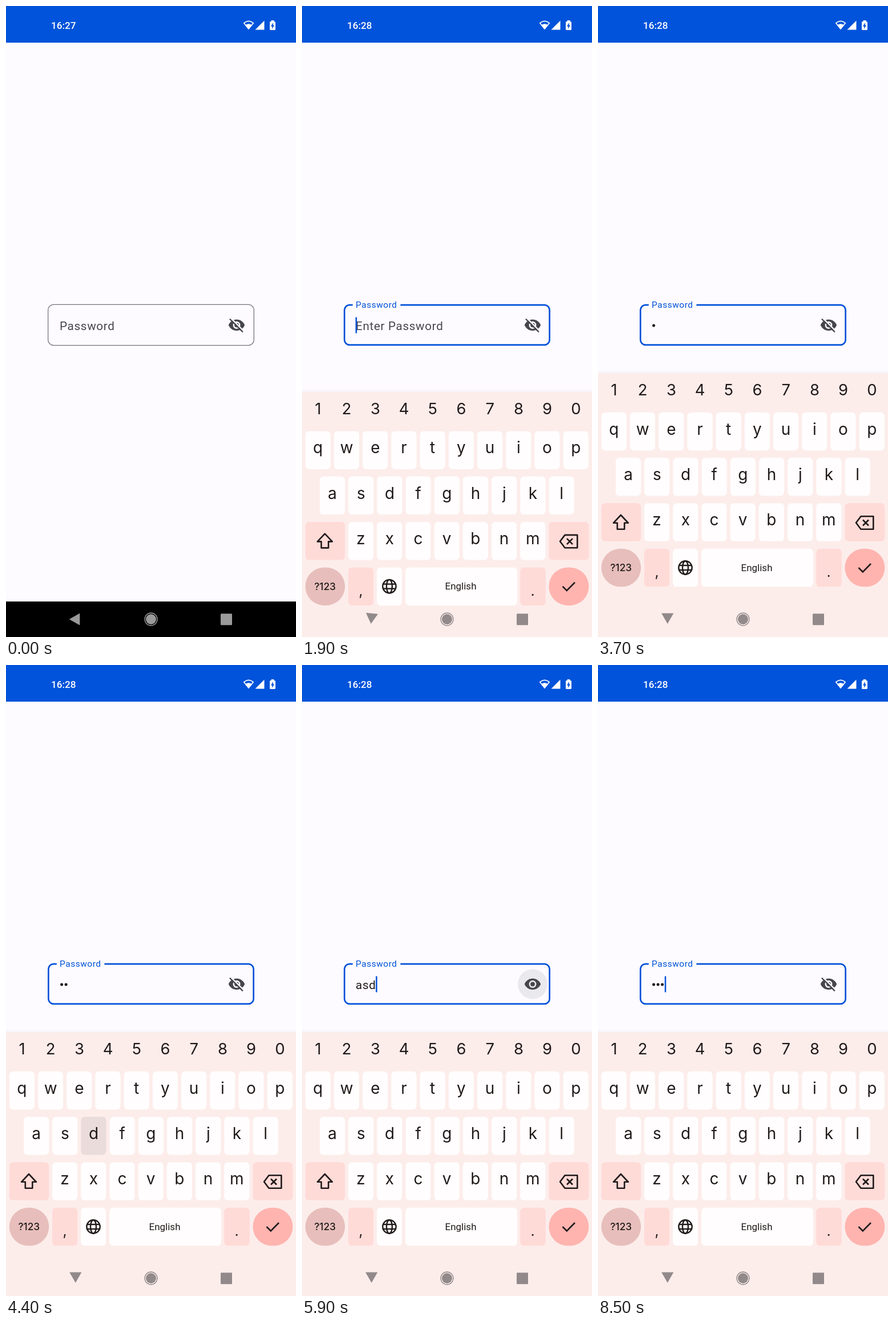
Recreate the animation shown at these times as an HTML page with a canvas. Size 508 by 1102 pixels, loop 9000 ms.

```html
<!DOCTYPE html>
<html lang="en">
<head>
<meta charset="utf-8">
<title>Password field</title>
<style>
  html, body { margin: 0; height: 100%; overflow: hidden; background: #fdfbff; }
  canvas { display: block; width: 100vw; height: 100vh; }
</style>
</head>
<body>
<canvas id="stage"></canvas>
<script>
const W = 508, H = 1102, LOOP = 9000, STEP = 100;
const BLUE = '#0052d9', PAGE = '#fdfbff', INK = '#201a1a', GREY = '#46464c';
const PINK = '#fcedeb', KEY = '#fffdfd', SOFT = '#ffdbd8', DOWN = '#eadcda';
const ROBOTO = 'Roboto, sans-serif', INTER = 'Inter, sans-serif';

const canvas = document.getElementById('stage');
const c = canvas.getContext('2d');
const dpr = window.devicePixelRatio || 1;
canvas.width = W * dpr;
canvas.height = H * dpr;

const TYPED = [3200, 3900, 4500];
const WORD = 'asd';
const PEEKS = [[5500, 6400], [6900, 7700]];
const FOCUS = 1700;

const clamp = x => Math.min(1, Math.max(0, x));
const mix = (a, b, p) => a + (b - a) * p;
const ramp = (t, from, to) => clamp((t - from) / (to - from));

function text(str, x, y, size, color, { font = ROBOTO, weight = 400, gap = 0, align = 'left' } = {}) {
  c.font = `${weight} ${size}px ${font}`;
  c.letterSpacing = gap + 'px';
  c.textAlign = align;
  c.fillStyle = color;
  c.fillText(str, x, y);
}

function box(x, y, w, h, r, color) {
  c.fillStyle = color;
  c.beginPath();
  c.roundRect(x, y, w, h, r);
  c.fill();
}

function disc(x, y, r, color) {
  c.fillStyle = color;
  c.beginPath();
  c.arc(x, y, r, 0, 7);
  c.fill();
}

function poly(points, closed) {
  c.beginPath();
  points.forEach(([x, y]) => c.lineTo(x, y));
  if (closed) c.closePath();
}

function outline(points, closed, width = 2.6) {
  c.strokeStyle = INK;
  c.lineWidth = width;
  poly(points, closed);
  c.stroke();
}

function fillPoly(points, color) {
  c.fillStyle = color;
  poly(points, true);
  c.fill();
}

function statusBar(t) {
  c.fillStyle = '#0053da';
  c.fillRect(0, 0, W, 64);
  text(t < 100 ? '16:27' : '16:28', 79, 39.5, 17.2, '#fff', { weight: 500 });

  // wifi
  c.strokeStyle = '#fff';
  c.lineWidth = 1.7;
  c.lineJoin = 'round';
  c.beginPath();
  c.moveTo(425, 40);
  c.lineTo(416.7, 29.8);
  c.quadraticCurveTo(425, 22.8, 433.3, 29.8);
  c.closePath();
  c.stroke();
  c.fillStyle = '#fff';
  c.beginPath();
  c.moveTo(425, 41);
  c.lineTo(419, 33.5);
  c.quadraticCurveTo(425, 28.8, 431, 33.5);
  c.fill();

  fillPoly([[436.5, 41.5], [452.5, 41.5], [452.5, 25.5]], '#fff');

  // battery
  box(462, 27, 10, 15, 1.5, '#fff');
  c.fillRect(464.6, 25, 4.8, 3);
  fillPoly([[467.8, 29], [464, 35.5], [466.3, 35.5], [466.3, 40], [470, 33.5], [467.8, 33.5]], '#0053da');
  c.lineJoin = 'miter';
}

function border(p) {
  const w = mix(1.3, 2.7, p), i = w / 2;
  const l = 73 + i, r = 435 - i, top = 520.7 + i, h = 72.6 - w;
  c.strokeStyle = p > 0 ? BLUE : '#74757c';
  c.lineWidth = w;
  c.beginPath();
  c.roundRect(l, top, r - l, h, 10.3 - i);
  c.stroke();
  if (p > 0) {
    c.fillStyle = PAGE;
    c.fillRect(mix(130, 88.8, p), 518, mix(0, 83.6, p), 8);
  }
}

function eye(open, ripple) {
  if (ripple > 0) disc(404, 557.3, 26 * Math.min(1, 0.5 + ripple / 2), `rgba(70,70,76,${0.1 * ripple})`);
  c.save();
  c.translate(388.5, 541.8);
  c.scale(1.293, 1.293);
  c.fillStyle = GREY;
  const lid = new Path2D('M12 4.5C7 4.5 2.73 7.61 1 12c1.73 4.39 6 7.5 11 7.5s9.27-3.11 11-7.5c-1.73-4.39-6-7.5-11-7.5z');
  lid.moveTo(17, 12);
  lid.arc(12, 12, 5, 0, 7);
  c.fill(lid, 'evenodd');
  disc(12, 12, 3, GREY);
  if (!open) {
    const slash = (d, color) => {
      c.strokeStyle = color;
      c.lineWidth = 1.8;
      c.beginPath();
      c.moveTo(2.63 + d, 3.63 - d);
      c.lineTo(20.37 + d, 21.37 - d);
      c.stroke();
    };
    slash(1.27, PAGE);
    slash(0, GREY);
  }
  c.restore();
}

// The caret restarts its one second blink on focus and on every typed key.
function caretOn(t) {
  if (t < FOCUS) return false;
  const start = TYPED.filter(k => k <= t).pop() ?? FOCUS;
  return (t - start) % 1000 < 500;
}

function field(t) {
  const p = ramp(t, FOCUS + 10, FOCUS + 160);
  const count = TYPED.filter(k => k <= t).length;
  const peek = PEEKS.find(([a, b]) => t >= a && t < b);
  const open = !!peek && t >= peek[0] + 100 && t < peek[0] + 600;
  const ripple = peek ? Math.min(ramp(t, peek[0], peek[0] + 200), ramp(t, peek[1], peek[1] - 300)) : 0;

  border(p);
  text('Password', 94, mix(565.8, 527, p), mix(20.7, 15.5, p), p > 0 ? BLUE : GREY, { gap: mix(0.65, 0.52, p) });

  let caret = 94.9;
  if (open) {
    text(WORD, 94, 565.8, 20.7, INK, { gap: 0.65 });
    caret = 94.9 + c.measureText(WORD).width;
  } else if (count) {
    for (let i = 0; i < count; i++) disc(97.6 + i * 7.5, 558, 2.5, INK);
    caret += count * 7.7;
  } else if (p > 0) {
    c.globalAlpha = clamp(p * 2 - 1);
    text('Enter Password', 94, 565.8, 20.7, GREY, { gap: 0.65 });
    c.globalAlpha = 1;
  }
  if (caretOn(t)) {
    c.fillStyle = BLUE;
    c.fillRect(caret - 1.2, 543.5, 2.5, 28);
  }
  eye(open, ripple);
}

function keyRow(letters, x, y, pressed) {
  [...letters].forEach((ch, i) => {
    const left = x + i * 50.2;
    box(left, y, 44.2, 66.5, 6.5, ch === pressed ? DOWN : KEY);
    text(ch, left + 22.1, y + 39, 28, INK, { font: INTER, align: 'center' });
  });
}

function globe(x, y) {
  c.strokeStyle = INK;
  c.lineWidth = 2.4;
  for (const rx of [11.7, 5]) {
    c.beginPath();
    c.ellipse(x, y, rx, 11.7, 0, 0, 7);
    c.stroke();
  }
  for (const dy of [-4, 4]) outline([[x - 11, y + dy], [x + 11, y + dy]], false, 2.4);
}

function keyboard(t) {
  const rest = 1 - ramp(t, 1745, 2065);
  const typing = TYPED.findIndex(k => t >= k - 100 && t < k);
  const pressed = WORD[typing];
  c.save();
  c.translate(0, 461 * rest ** 4);

  const shade = c.createLinearGradient(0, 636, 0, 642);
  shade.addColorStop(0, 'rgba(120,90,90,0)');
  shade.addColorStop(1, 'rgba(120,90,90,.06)');
  c.fillStyle = shade;
  c.fillRect(0, 636, W, 6);
  c.fillStyle = PINK;
  c.fillRect(0, 641.5, W, 470);

  [...'1234567890'].forEach((n, i) =>
    text(n, 28 + i * 50.2, 680.3, 27.5, INK, { font: INTER, align: 'center' }));
  keyRow('qwertyuiop', 5.8, 709.8, pressed);
  keyRow('asdfghjkl', 31, 789, pressed);
  keyRow('zxcvbnm', 81, 868.3, pressed);

  c.lineJoin = 'round';
  box(5.8, 868.3, 69.5, 66.5, 6.5, SOFT);
  outline([[40, 889], [53, 902.8], [46.3, 902.8], [46.3, 913.8], [33.8, 913.8], [33.8, 902.8], [27, 902.8]], true);
  box(432.4, 868.3, 70, 66.5, 6.5, SOFT);
  outline([[452, 902.5], [460.5, 891.3], [482.3, 891.3], [482.3, 913.7], [460.5, 913.7]], true);
  outline([[464, 897.5], [474, 907.5]]);
  outline([[474, 897.5], [464, 907.5]]);
  c.lineJoin = 'miter';

  const y = 947.8;
  box(5.8, y, 69.5, 66.5, 33.2, '#e7bebb');
  text('?123', 40.3, 987, 17.3, INK, { font: INTER, weight: 500, align: 'center' });
  box(81, y, 44.2, 66.5, 6.5, SOFT);
  text(',', 103, 997, 25, INK, { font: INTER, align: 'center' });
  box(131, y, 44.2, 66.5, 6.5, KEY);
  globe(153, 981);
  box(181, y, 196, 66.5, 6.5, KEY);
  text('English', 278, 986.5, 17, INK, { align: 'center' });
  box(382.3, y, 44.6, 66.5, 6.5, SOFT);
  text('.', 404, 997, 25, INK, { font: INTER, align: 'center' });
  box(432.4, y, 70, 66.5, 33.2, '#ffb4af');
  outline([[456.5, 981], [463.8, 988.3], [478, 974]]);
  c.restore();
}

function navigation(t) {
  const up = t > FOCUS;
  const color = up ? '#928a8a' : '#9b9a9b';
  const turn = 1 - (1 - ramp(t, 1745, 2000)) ** 3;

  c.save();
  c.translate(mix(120.5, 121.8, turn), mix(1071, 1069.3, turn));
  c.rotate(-Math.PI / 2 * turn);
  fillPoly([[-9.7, 0], [8.8, -10.6], [8.8, 10.6]], color);
  c.restore();

  disc(254, 1071, 9, color);
  c.strokeStyle = color;
  c.lineWidth = 1.3;
  c.beginPath();
  c.arc(254, 1071, 11, 0, 7);
  c.stroke();
  box(376, 1061.2, 20, 20, 1.2, color);
}

function draw(now) {
  const t = Math.floor((now % LOOP) / STEP) * STEP;
  c.setTransform(dpr, 0, 0, dpr, 0, 0);
  c.fillStyle = PAGE;
  c.fillRect(0, 0, W, H);
  statusBar(t);
  field(t);
  c.fillStyle = '#000';
  c.fillRect(0, 1040, W, H - 1040);
  if (t > FOCUS) keyboard(t);
  navigation(t);
}

let begin;
function tick(now) {
  begin ??= now;
  draw(Math.max(0, now - begin));
  requestAnimationFrame(tick);
}
requestAnimationFrame(tick);
</script>
</body>
</html>
```
